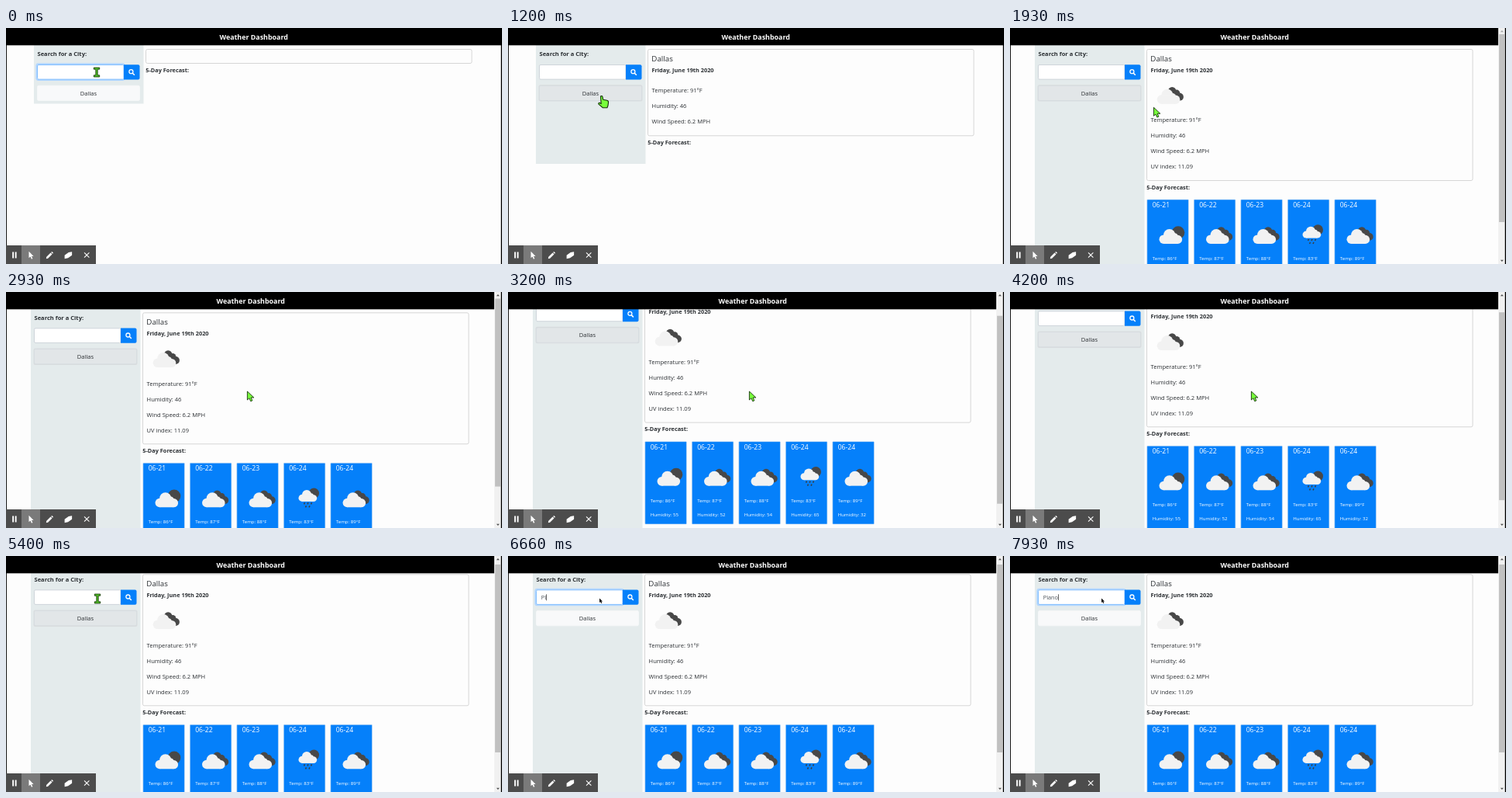
Write an HTML page that moves like this. It is 640 px wide and 304 px high and loops after 8 s.

```html
<!DOCTYPE html>
<html lang="en">
<head>
<meta charset="utf-8">
<title>Weather Dashboard</title>
<style>
  html, body { margin: 0; width: 100%; height: 100%; overflow: hidden; background: #fdfdfd; }
  svg { display: block; width: 640px; height: 304px; }
  text { font-family: "Open Sans", "Noto Sans", sans-serif; font-size: 7.55px; fill: #2b2f33; white-space: pre; }
  .bold { font-weight: 700; font-size: 7.35px; }
  .card text { fill: #fff; font-size: 6.1px; font-weight: 500; }
  .card .date { font-size: 8.6px; }
</style>
</head>
<body>
<svg viewBox="0 0 640 304">
  <defs>
    <g id="puff">
      <circle cx="5.8" cy="13.2" r="5.8"/><circle cx="13.2" cy="7.6" r="7.6"/>
      <circle cx="20" cy="9.4" r="4.2"/><circle cx="24" cy="13.4" r="5.6"/>
      <rect x="5.8" y="9" width="18" height="10"/>
    </g>
    <g id="clouds">
      <g fill="#484848">
        <circle cx="19.5" cy="2.4" r="5.2"/><circle cx="25.3" cy="5.2" r="4.4"/><circle cx="29.3" cy="9.9" r="4.9"/>
        <path d="M18 4l9-2 4 10-8 2z"/>
      </g>
      <use href="#puff" fill="#f2f2f2"/>
    </g>
    <g id="moon">
      <circle cx="24.5" cy="4.5" r="8.3" fill="#484848"/>
      <use href="#puff" fill="#f2f2f2"/>
    </g>
    <g id="rain">
      <circle cx="23.3" cy="1" r="6.7" fill="#484848"/>
      <use href="#puff" transform="translate(3.5 -3.2) scale(.8 .78)" fill="#f2f2f2"/>
      <path d="M11.5 13l-1 2M16 13l-1 2M20.5 13l-1 2M13.5 17l-1 2M18 17l-1 2" stroke="#3c3c3c" stroke-width="1.5"/>
    </g>
  </defs>

  <rect width="640" height="304" fill="#fdfdfd"/>
  <g id="page">
    <rect id="side" x="36" y="0" width="141.5" fill="#e4ebec"/>
    <text class="bold" x="40.5" y="36.4" style="font-size:7.55px">Search for a City:</text>

    <rect id="glow" x="39.2" y="46.2" width="113.6" height="21" rx="2.6" fill="none" stroke="#b3d7ff" stroke-width="1.7"/>
    <rect id="input" x="40.5" y="47.5" width="111.5" height="18.6" rx="1.5" fill="#fff"/>
    <text id="typed" x="46.8" y="59.6" style="font-size:7.3px;fill:#495057"></text>
    <rect id="caret" y="53" width=".7" height="8" fill="#222"/>
    <path d="M152 47.3h18.5a2 2 0 0 1 2 2v15.2a2 2 0 0 1-2 2H152z" fill="#0580fa"/>
    <g fill="none" stroke="#fff" stroke-linecap="round">
      <circle cx="161.4" cy="56.2" r="2.5" stroke-width="1.3"/>
      <path d="M163.4 58.2l2 2" stroke-width="1.6"/>
    </g>

    <rect id="ring" x="39.5" y="73.2" width="134" height="21.4" rx="2.5" fill="#d8d9db" opacity=".8"/>
    <rect id="city" x="40.5" y="74.3" width="132" height="19.2" rx="1.8" stroke-width=".7"/>
    <text x="106.5" y="86.7" text-anchor="middle">Dallas</text>

    <rect id="box" x="180.5" y="27.5" width="420.5" rx="2" fill="#fdfdfd" stroke="#d2d2d2" stroke-width=".9"/>
    <g id="summary">
      <text x="185.3" y="42.8" style="font-size:9.75px;font-weight:500">Dallas</text>
      <text class="bold" x="185.5" y="56.7">Friday, June 19th 2020</text>
      <use id="now" href="#clouds" x="193.7" y="78.8"/>
      <g id="facts"></g>
    </g>
    <text id="label" class="bold" x="180.3">5-Day Forecast:</text>
    <g id="cards"></g>
  </g>

  <g id="bar">
    <rect x="630" width="9" height="304" fill="#f1f1f1"/>
    <rect id="thumb" x="631" width="7" height="242" fill="#c1c1c1"/>
    <path id="up" d="M632.8 5.3l2-2.4 2 2.4z"/>
    <path id="down" d="M632.8 298.7l2 2.4 2-2.4z"/>
  </g>
  <rect id="nav" height="22.3" fill="#000"/>
  <text id="title" class="bold" y="15" text-anchor="middle" style="font-size:8.9px;fill:#fff">Weather Dashboard</text>
  <path d="M0 0h.9v304H0zM638.7 0H640v304h-1.3z" fill="#000"/>

  <g id="tools">
    <rect y="280" width="116" height="24" fill="#4c4c4c"/>
    <rect x="20" y="280" width="24" height="24" fill="#7a7a7a"/>
    <g fill="#fff">
      <path d="M8.2 288.5h1.9v8H8.2zM11.7 288.5h1.9v8h-1.9z"/>
      <path d="M29.5 287.7v8.6l2-1.8 1.5 3.3 1.4-.7-1.5-3.2h2.7z"/>
      <path d="M51.8 297.2l.5-2.4 5.3-5.3 1.9 1.9-5.3 5.3zM58.2 288.9l1-1 1.9 1.9-1 1z"/>
      <path d="M75.6 297.3v-4.6l5.2-3.8 4.3-.6v4.5l-5 3.5z"/>
    </g>
    <path d="M101 289.3l6.4 6.4M107.4 289.3l-6.4 6.4" stroke="#fff" stroke-width="1.1"/>
  </g>

  <g id="pointer" stroke="#143008" stroke-linejoin="round">
    <path id="arrow" d="M0 0v11l2.5-2.2 1.9 4 2.1-1-1.9-3.8h3.8z" fill="#78ff3c" stroke-width=".9"/>
    <path id="hand" d="M-1-1c1-1 2.3-.3 2.5.8l.8 3.5 5 1c1.5.4 2 1.5 1.7 3l-.6 4-1 2.4H1.7L-3.5 9.2c-.8-1 .2-2.3 1.6-1.7l1.6 1.1z" fill="#78ff3c" stroke-width="1.1"/>
    <path id="beam" d="M-3.7-6h7.4v2.2H1.2v7.6h2.5V6h-7.4V3.8h2.5v-7.6h-2.5z" fill="#4fbf25" stroke-width=".8"/>
    <path id="tiny" d="M0-.5v5.6l1.3-1.1 1 2 1-.5-.9-1.9h1.7z" fill="#111" stroke="none"/>
  </g>
</svg>
<script>
const LOOP = 8000, LOADED = 1080, FULL = 1400, FOCUS = 5600;
const $ = id => document.getElementById(id);
const set = (id, attrs) => { for (const k in attrs) $(id).setAttribute(k, attrs[k]); };
const show = (id, on) => { $(id).style.display = on ? '' : 'none'; };
const clamp = v => Math.max(0, Math.min(1, v));

$('facts').innerHTML = ['Temperature: 91°F', 'Humidity: 46', 'Wind Speed: 6.2 MPH', 'UV index: 11.09']
  .map((s, i) => `<text x="185.6" y="${83.3 + 20 * i}"${i == 3 ? ' id="uv"' : ''}>${s}</text>`).join('');

$('cards').innerHTML = [
  ['06-21', 'moon', 86, 55], ['06-22', 'clouds', 87, 52], ['06-23', 'clouds', 88, 54],
  ['06-24', 'rain', 83, 65], ['06-24', 'clouds', 89, 32]
].map(([date, icon, temp, hum], i) => `<g class="card" transform="translate(${180.5 + 60.5 * i} 220.7)">
  <rect x=".3" y=".3" width="53.6" height="106.4" rx=".8" fill="#0580fa" stroke="#cfe0f2" stroke-width=".6"/>
  <text class="date" x="7.2" y="10.4">${date}</text>
  <use href="#${icon}" x="16" y="38.3"/>
  <text x="7.3" y="78.4">Temp: ${temp}°F</text>
  <text x="7.3" y="96.3">Humidity: ${hum}</text></g>`).join('');

// rows: time, then values; eased between rows
const scrollPath = [[2760, 0], [2930, .7], [3450, 52.7], [3850, 52.7], [4200, 22.7], [4650, 3.7]];
const mousePath = [[130, 117, 57], [800, 120.5, 89], [1500, 120.5, 89], [2600, 311.4, 128], [4550, 311.4, 128], [5300, 118, 55]];
const keys = [[6400, 'P'], [6600, 'Pl'], [6930, 'Pla'], [7200, 'Plan'], [7500, 'Plano']];

function at(path, t) {
  let i = path.findIndex(row => row[0] > t);
  if (i < 0) i = path.length;
  const a = path[Math.max(0, i - 1)], b = path[Math.min(i, path.length - 1)];
  const u = a === b ? 0 : (t - a[0]) / (b[0] - a[0]);
  const e = u * u * (3 - 2 * u);
  return a.slice(1).map((v, k) => v + (b[k + 1] - v) * e);
}

function draw(t) {
  const loaded = t >= LOADED, full = t >= FULL;
  const [scroll] = at(scrollPath, t), [mx, my] = at(mousePath, t);
  const dx = full ? -4 : 0;

  set('page', { transform: `translate(${dx} ${-scroll})` });
  set('side', { height: full ? 345.7 : loaded ? 175 : 97.5 });
  set('box', { height: full ? 169 : loaded ? 111.3 : 18 });
  set('label', { y: full ? 207.6 : loaded ? 149.7 : 56.7 });
  set('facts', { transform: `translate(0 ${full ? 38 : 0})` });
  show('summary', loaded);
  ['now', 'uv', 'cards', 'bar'].forEach(id => show(id, full));

  set('nav', { width: full ? 630 : 640 });
  set('title', { x: 319.7 + dx });
  set('thumb', { y: 8 + scroll * .8 });
  set('up', { fill: scroll > 0 ? '#505050' : '#a3a3a3' });
  set('down', { fill: scroll < 52.7 ? '#505050' : '#a3a3a3' });

  const px = mx - dx, py = my + scroll;
  const inside = (x0, y0, x1, y1) => px > x0 && px < x1 && py > y0 && py < y1;
  const overCity = inside(40, 74, 173, 94), overInput = inside(40, 47, 152, 66.5);
  const cityFocus = t >= 1000 && t < FOCUS;
  const lit = overCity || cityFocus;
  set('city', { fill: lit ? '#e2e6e8' : '#f8f9fa', stroke: lit ? '#d5dbe0' : '#f8f9fa' });
  show('ring', cityFocus);

  const focus = t < FOCUS ? 1 - clamp((t - 1000) / 150) : clamp((t - FOCUS) / 150);
  set('glow', { opacity: focus });
  set('input', { stroke: focus > .5 ? '#80bdff' : '#ced4da' });

  const last = keys.filter(k => k[0] <= t).pop();
  const word = last ? last[1] : '';
  $('typed').textContent = word;
  const since = t - (last ? last[0] : FOCUS);
  show('caret', t >= FOCUS && since % 1000 < 500);
  set('caret', { x: 47 + (word ? $('typed').getComputedTextLength() : 0) });

  const kind = last ? 'tiny' : overInput ? 'beam' : overCity || inside(152, 47, 173, 66.5) ? 'hand' : 'arrow';
  ['arrow', 'hand', 'beam', 'tiny'].forEach(id => show(id, id === kind));
  set('pointer', { transform: `translate(${mx} ${my})` });
}

const start = performance.now();
function tick() {
  draw((performance.now() - start) % LOOP);
  requestAnimationFrame(tick);
}
tick();
</script>
</body>
</html>
```
